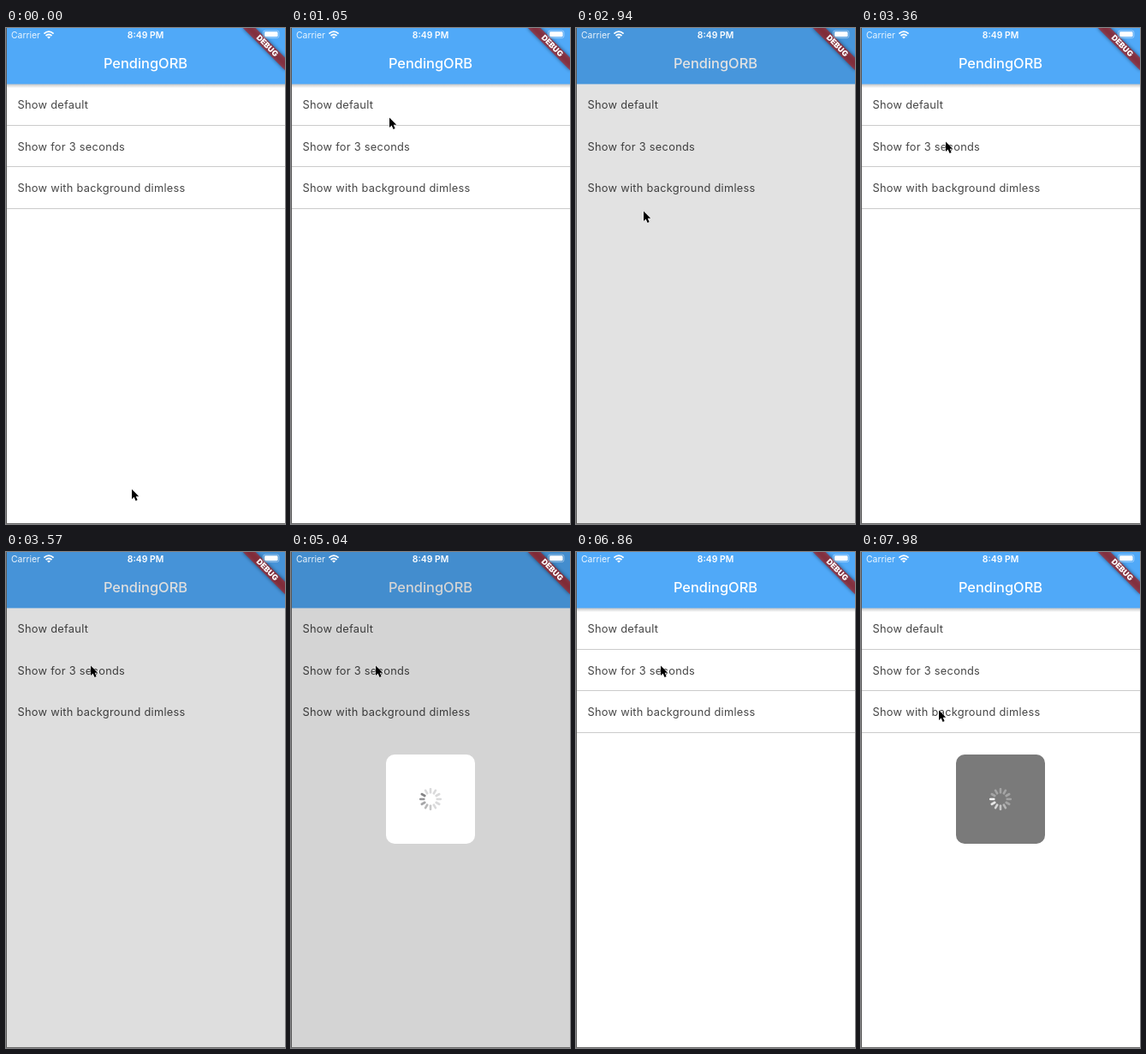
An HTML page that plays this animation: 326x578 px, repeating every 8000 ms.

```html
<!DOCTYPE html>
<html lang="en">
<head>
<meta charset="utf-8">
<title>Loading overlay demo</title>
<style>
  html, body { margin: 0; width: 100%; height: 100%; overflow: hidden; background: #fff; }
  svg { display: block; width: 326px; height: 578px; font-family: Inter, Roboto, sans-serif; }
  #rows { font-size: 12.8px; letter-spacing: .28px; fill: #464646; }
  .status { font-size: 10.4px; fill: #fff; }
</style>
</head>
<body>
<svg viewBox="0 0 326 578">
  <defs>
    <linearGradient id="fall" x2="0" y2="1">
      <stop stop-color="#000" stop-opacity=".24"/>
      <stop offset="1" stop-color="#000" stop-opacity="0"/>
    </linearGradient>
    <filter id="soft" x="-20%" y="-100%" width="140%" height="300%">
      <feGaussianBlur stdDeviation="2.4"/>
    </filter>
  </defs>

  <rect width="326" height="578" fill="#fff"/>
  <g id="lines" stroke="#cbcbcb">
    <rect y="65" width="326" height="5" fill="url(#fall)" stroke="none"/>
  </g>
  <rect width="326" height="65.4" fill="#50a9f8"/>
  <text x="163" y="47" text-anchor="middle" font-size="16.4" font-weight="550" fill="#fff">PendingORB</text>
  <g id="rows"></g>

  <rect id="dim" width="326" height="578" fill="#000300"/>

  <g id="hud">
    <rect id="panel" x="111" y="236" width="104" height="104" rx="10"/>
    <g id="ticks" transform="translate(163 288)"></g>
  </g>

  <g transform="translate(326) rotate(45) scale(.869)">
    <rect x="-40" y="28" width="80" height="12" opacity=".5" filter="url(#soft)"/>
    <rect x="-40" y="28" width="80" height="12" fill="#b71c1c" fill-opacity=".63"/>
    <text y="37.2" text-anchor="middle" font-size="10.4" font-weight="900" fill="#fff">DEBUG</text>
  </g>

  <g class="status">
    <text x="6" y="11.7" fill-opacity=".88">Carrier</text>
    <text x="163" y="11.7" text-anchor="middle" font-weight="600">8:49 PM</text>
    <path d="M44.4 6.6Q50 1.6 55.6 6.6M46.5 9Q50 6 53.5 9" fill="none" stroke="#fff" stroke-width="1.8"/>
    <path d="M50 12.6L48 10.5Q50 9 52 10.5Z"/>
    <rect x="300.5" y="3" width="18.5" height="8.6" rx="2.4" fill="none" stroke="#fff" stroke-opacity=".4"/>
    <rect x="302" y="4.3" width="15.6" height="6" rx="1.4"/>
  </g>

  <path d="M.5 0V578" stroke="#5a5a5a"/>
  <path d="M0 577.5H326" stroke="#6a6a6a"/>

  <path id="cursor" d="M0 .6V12L2.6 9.6L4.6 14L6.6 13.1L4.7 8.8H8.2Z"
        stroke="#fff" stroke-width=".8" paint-order="stroke"/>
</svg>

<script>
const LOOP = 8000, STEP = 70, SPIN = 1050, GLIDE = 210;
const MAX_DIM = .17, ROW = 48.67, BAR = 65.4;

// "turn" is the spinner's starting tick.
const overlays = [
  { open: 1050, close: 2870, turn: 9 },
  { open: 3500, close: 3500 + 3 * SPIN, turn: 1 },
  { open: 7350, close: Infinity, turn: 2, dimless: true }
];

const pointer = { x: 147, y: 537 };
const glides = [
  { at: 0, x: 121, y: 188 },
  { at: 560, x: 115, y: 104 },
  { at: 2590, x: 79, y: 213 },
  { at: 2940, x: 99, y: 132 },
  { at: 7140, x: 91, y: 184 }
];

const el = id => document.getElementById(id);
const ramp = (t, start, length) => Math.min(1, Math.max(0, (t - start) / length));
const smooth = p => p * p * (3 - 2 * p);
const easeOut = p => 1 - (1 - p) ** 2;

function set(node, attrs) {
  for (const name in attrs) node.setAttribute(name, attrs[name]);
  return node;
}

function add(parent, tag, attrs) {
  const node = document.createElementNS('http://www.w3.org/2000/svg', tag);
  return el(parent).appendChild(set(node, attrs));
}

['Show default', 'Show for 3 seconds', 'Show with background dimless'].forEach((label, i) => {
  add('rows', 'text', { x: 13.5, y: BAR + ROW * i + 28.6 }).textContent = label;
  add('lines', 'path', { d: `M0 ${Math.floor(BAR + ROW * (i + 1)) - .5}H326` });
});

const ticks = Array.from({ length: 12 }, (_, i) => add('ticks', 'rect', {
  x: -1.3, y: -13, width: 2.6, height: 6.5, rx: 1, transform: `rotate(${i * 30})`
}));

function drawCursor(t) {
  let { x, y } = pointer;
  for (const glide of glides) {
    const p = smooth(ramp(t, glide.at, GLIDE));
    x += (glide.x - x) * p;
    y += (glide.y - y) * p;
  }
  set(el('cursor'), { transform: `translate(${x} ${y})` });
}

function drawOverlay(t) {
  const { open, close, turn, dimless } = overlays.findLast(o => t >= o.open) || overlays[0];
  const shade = dimless ? 0 : easeOut(ramp(t, open, 140)) - ramp(t, close, 210);
  set(el('dim'), { opacity: MAX_DIM * shade });
  set(el('lines'), { opacity: Math.max(0, 1 - shade * 1.5) });
  set(el('hud'), { opacity: ramp(t, open + 70, 140) - ramp(t, close - 70, 140) });
  set(el('panel'), { fill: dimless ? '#7a7a7a' : '#fff' });
  set(el('ticks'), { fill: dimless ? '#fff' : '#3c3c40' });

  const head = Math.floor(t / SPIN * 12) + turn;
  ticks.forEach((tick, i) => {
    const age = (head - i + 12) % 12;
    const glow = Math.max(0, 1 - age / 5);
    set(tick, { opacity: dimless ? .32 + .62 * glow : .19 + .44 * glow });
  });
}

const origin = performance.now();
function frame() {
  const t = Math.floor((performance.now() - origin) % LOOP / STEP) * STEP;
  drawCursor(t);
  drawOverlay(t);
  requestAnimationFrame(frame);
}
frame();
</script>
</body>
</html>
```
